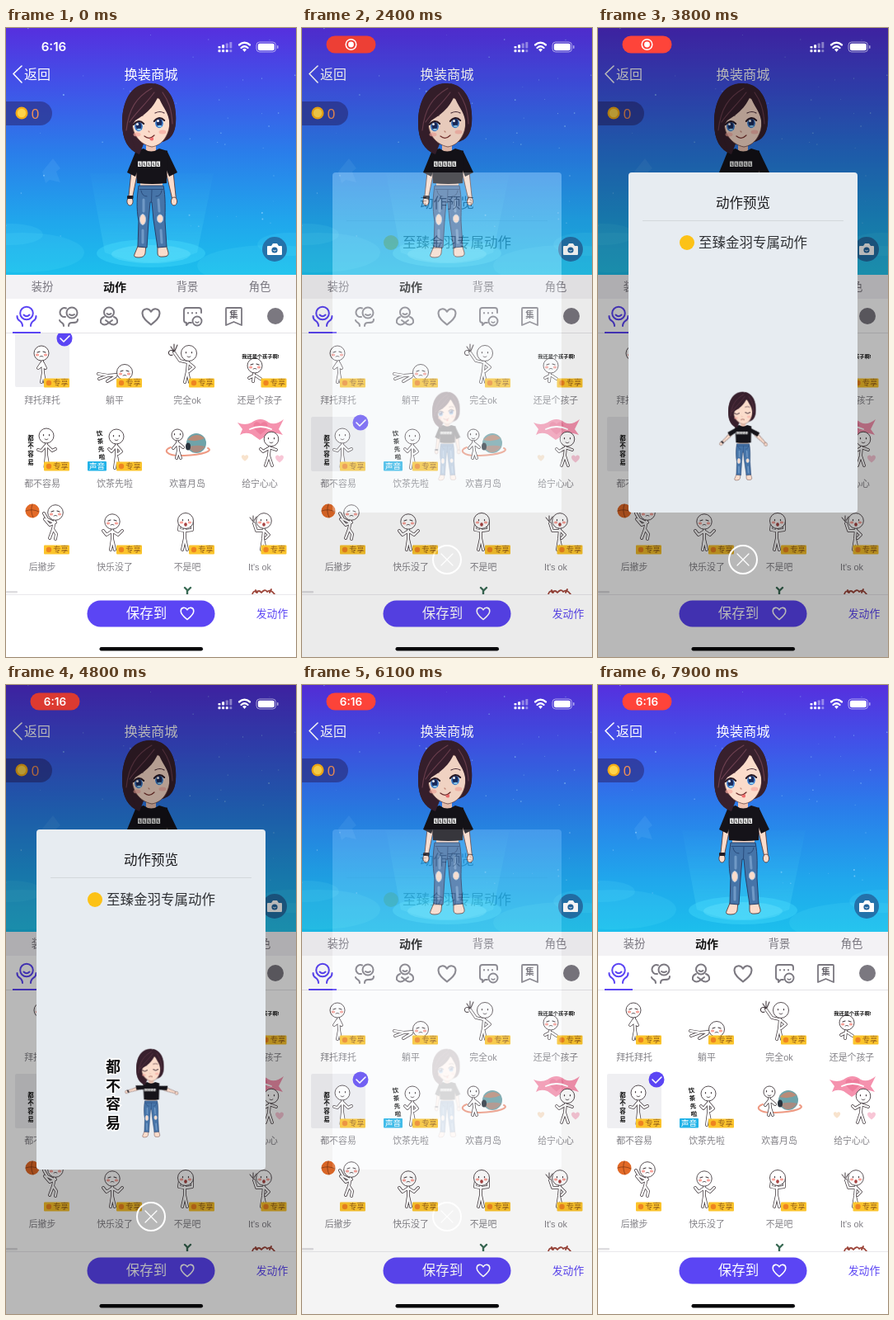
These frames come from a looping animation (352x762 px, 8 s). An HTML page:

```html
<!DOCTYPE html>
<html lang="zh-CN">
<head>
<meta charset="utf-8">
<title>换装商城</title>
<style>
html, body { margin: 0; width: 100%; height: 100%; overflow: hidden; background: #fff; }
svg { display: block; width: 352px; height: 762px; }
text { font-family: "Liberation Sans", "Noto Sans CJK SC", "Noto Sans CJK", sans-serif; }

.clock, .pill, .rec, .pillTime, .selA, .selB, .modal, .word,
.armL, .armR, .preview .head, .tongue, .smile, .shut {
  animation: 8s linear infinite;
}
.clock { animation-name: clock; }
.pill { animation-name: pill; }
.pillBody { animation: pulse 2s ease-in-out -0.1s infinite; }
.rec { animation-name: rec; }
.pillTime { animation-name: pillTime; }
.selA { animation-name: selA; }
.selB { animation-name: selB; }
.modal { animation-name: modal; }
.word { animation-name: word; }
.star { animation: twinkle 4s ease-in-out infinite; }

@keyframes clock { 0%, 5% { opacity: 1 } 7.5%, 100% { opacity: 0 } }
@keyframes pill { 0%, 5% { opacity: 0 } 7.5%, 100% { opacity: 1 } }
@keyframes pulse { 0%, 100% { fill: #ff443a } 50% { fill: #db3a31 } }
@keyframes rec { 0%, 48% { opacity: 1 } 51%, 100% { opacity: 0 } }
@keyframes pillTime { 0%, 48% { opacity: 0 } 51%, 100% { opacity: 1 } }
@keyframes selA { 0%, 28% { opacity: 1 } 28.01%, 100% { opacity: 0 } }
@keyframes selB { 0%, 28% { opacity: 0 } 28.01%, 100% { opacity: 1 } }
@keyframes modal { 0%, 29% { opacity: 0 } 32.5%, 73.1% { opacity: 1 } 76.9%, 100% { opacity: 0 } }
@keyframes word { 0%, 48% { opacity: 0 } 50%, 69% { opacity: 1 } 69.1%, 100% { opacity: 0 } }
@keyframes twinkle { 50% { opacity: .3 } }

/* Faces of the stage figure */
.stage .tongue { animation-name: idleFace; }
.stage .smile { animation-name: busyFace; }
.stage .shut { opacity: 0; animation: none; }
@keyframes idleFace { 0%, 30% { opacity: 1 } 30.01%, 72% { opacity: 0 } 72.01%, 100% { opacity: 1 } }
@keyframes busyFace { 0%, 30% { opacity: 0 } 30.01%, 72% { opacity: 1 } 72.01%, 100% { opacity: 0 } }

/* Preview figure: raise the arms, drop them, shrug, rest */
.preview .tongue { animation-name: restFace; }
.preview .smile { animation-name: cheerFace; }
.preview .shut { animation-name: shrugFace; }
@keyframes restFace { 0%, 33% { opacity: 1 } 33.01%, 69% { opacity: 0 } 69.01%, 100% { opacity: 1 } }
@keyframes cheerFace { 0%, 33% { opacity: 0 } 33.01%, 46% { opacity: 1 } 46.01%, 100% { opacity: 0 } }
@keyframes shrugFace { 0%, 46% { opacity: 0 } 46.01%, 69% { opacity: 1 } 69.01%, 100% { opacity: 0 } }
.armL { transform-origin: 157px 156px; }
.armR { transform-origin: 198px 156px; }
.head { transform-origin: 176px 148px; }
.preview .armL { animation-name: armL; animation-timing-function: ease-in-out; }
.preview .armR { animation-name: armR; animation-timing-function: ease-in-out; }
.preview .head { animation-name: head; animation-timing-function: ease-in-out; }
@keyframes armL {
  0%, 32% { transform: none } 35.5%, 39% { transform: rotate(152deg) }
  45% { transform: rotate(10deg) } 50%, 66% { transform: rotate(62deg) scaleY(.76) }
  70%, 100% { transform: none }
}
@keyframes armR {
  0%, 32% { transform: none } 35.5%, 39% { transform: rotate(-131deg) }
  45% { transform: rotate(-10deg) } 50%, 66% { transform: rotate(-59deg) scaleY(.78) }
  70%, 100% { transform: none }
}
@keyframes head {
  0%, 32% { transform: none } 35.5%, 39% { transform: translate(7px, 0) rotate(4deg) }
  45%, 100% { transform: none }
}
</style>
</head>
<body>
<script>
const INK = '#453c40', GREY = '#7b7880', VIOLET = '#5b45f4', SKIN = '#fbdccb', HAIR = '#38202d';

const el = (tag, attrs, body = '') => `<${tag} ${attrs}>${body}</${tag}>`;
const g = (attrs, ...parts) => el('g', attrs, parts.join(''));
const rect = (x, y, w, h, fill, r = 0, more = '') =>
  el('rect', `x="${x}" y="${y}" width="${w}" height="${h}" rx="${r}" fill="${fill}" ${more}`);
const oval = (x, y, rx, ry, fill, more = '') =>
  el('ellipse', `cx="${x}" cy="${y}" rx="${rx}" ry="${ry}" fill="${fill}" ${more}`);
const dot = (x, y, r, fill, more) => oval(x, y, r, r, fill, more);
const ring = (x, y, r, color, w) => dot(x, y, r, 'none', `stroke="${color}" stroke-width="${w}"`);
const shape = (d, fill, more = '') => el('path', `d="${d}" fill="${fill}" ${more}`);
const line = (d, color, w = 1) =>
  shape(d, 'none', `stroke="${color}" stroke-width="${w}" stroke-linecap="round" stroke-linejoin="round"`);
// Text placed by its vertical centre
const label = (x, cy, s, size, fill, more = 'text-anchor="middle"') =>
  el('text', `x="${x}" y="${cy + size * .36}" font-size="${size}" fill="${fill}" ${more}`, s);
const column = (x, y, gap, s, size, more = '') =>
  [...s].map((c, i) => label(x, y + i * gap, c, size, '#111', `text-anchor="middle" font-weight="900" ${more}`)).join('');
const heart = (x, y, k, fill, stroke = 'none') =>
  shape('M0 9C-5 5-10 1-10-4C-10-10-3-11 0-6C3-11 10-10 10-4C10 1 5 5 0 9Z', fill,
    `transform="translate(${x} ${y}) scale(${k})" stroke="${stroke}" stroke-width="2" stroke-linejoin="round"`);

function eye(x, y) {
  return oval(x, y, 5.4, 6.2, '#fff') + oval(x, y + .3, 4.9, 5.9, '#3c78c4') + oval(x, y - .5, 3.3, 4.2, '#1b2b5c') +
    dot(x - 1.5, y - 2.5, 1.5, '#fff') + oval(x + .5, y + 4, 2.4, 1.3, '#8fd0f4') +
    line(`M${x - 6.2} ${y - 2}Q${x} ${y - 9.5} ${x + 6.2} ${y - 3}`, '#2b1a26', 2);
}

function avatar(cls) {
  const edge = 'stroke="#5b3b3a" stroke-width=".9"', denim = 'stroke="#263f68" stroke-width="1"';
  const arm = (side, d, hx, more) => g(`class="arm${side}"`,
    shape(d, SKIN, edge), oval(hx, 210, 3.6, 5, SKIN, edge), more);
  const face = (name, ...parts) => g(`class="${name}"`, ...parts);
  const eyes = eye(161, 119) + eye(186, 115);
  return g(`class="${cls}"`,
    // feet and legs
    shape('M161 262L170 262L169 273Q168 278 161 278Q154 278 156 274Z', SKIN, edge),
    shape('M184 262L194 262L197 272Q198 277 191 277Q184 278 184 273Z', SKIN, edge),
    rect(163, 182, 27, 12, SKIN),
    shape('M161 191L191 191C194 205 193 220 193 234L195 265L184 266L179 232L177 211L175 211L173 234L171 266L160 265L161 234C158 218 159 204 161 191Z', '#4674a8', denim),
    line('M162 195.500H191M177 196L176.500 211M164 197Q165 204 171 204M189 197Q188 204 182 204', '#294b7c', 1),
    line('M167 208V222M185 208L186 222M166 245V260M188 245L189 260', '#7099c6', 3),
    oval(166, 232, 3.6, 6.5, SKIN, 'stroke="#a9c3dd" stroke-width="1"'),
    oval(187, 231, 3.6, 5, SKIN, 'stroke="#a9c3dd" stroke-width="1"'),
    // arms
    arm('L', 'M153 165L148.500 208L153 208L159 178L160 162Z', 150.5,
      rect(147, 203, 7.5, 4, '#201c25', 1) + shape('M158 148L147 175L157 180L165 157Z', '#151319')),
    arm('R', 'M202 165L206.500 208L202 208L195 178L194 162Z', 204,
      shape('M195 148L208 175L198 180L189 157Z', '#151319')),
    // shirt
    rect(170, 138, 12, 14, '#efc4b2'),
    shape('M167 146Q176 153 186 146L196 149L195 188Q178 190 159 188L157 149Z', '#151319'),
    [0, 1, 2, 3, 4].map(i => rect(160 + i * 5.6, 161.5, 4.7, 6.5, '#eee') +
      line(`M${162 + i * 5.6} 163.3v3h1.2`, '#222', .9)).join(''),
    g('class="head"',
      shape('M176 67C152 66 141 88 141 115C141 135 148 148 162 153L168 138L190 138C204 134 207 120 206 104C205 82 194 68 176 67Z', HAIR),
      shape('M153 110C152 128 162 141 177 144C190 142 198 130 199 114C198 92 190 84 178 84C160 86 154 96 153 110Z', SKIN, 'stroke="#6a4540" stroke-width=".8"'),
      oval(159, 129, 4.5, 2.5, '#f8aaa0', 'opacity=".7"'), oval(190, 126, 4.5, 2.5, '#f8aaa0', 'opacity=".7"'),
      line('M173 125L174 126', '#c98c7c', 1.2),
      line('M157 107Q162 104 166 106M181 103Q187 100 192 103', '#4a2c38', 1.2),
      face('tongue', eyes, line('M168 131Q174 136 180 130', '#6b2b2b', 1.2),
        shape('M174 134L178.500 132Q180 136 177.500 136.500Q175 137 174 134Z', '#f06d6d')),
      face('smile', eyes, line('M168 131Q174 136 180 130', '#7a332f', 1.2)),
      face('shut', line('M155 118Q161 123 167 118M181 116Q187 121 193 116', '#2b1a26', 1.8),
        line('M171 133Q175 131 179 133', '#7a332f', 1.3)),
      shape('M188 73C183 93 172 103 157 112C150 120 151 142 162 153C148 148 141 135 141 115C141 85 155 68 176 67Z', HAIR),
      shape('M182 72C186 93 196 98 198 112C199 121 198 129 195 136C205 131 207 118 206 104C205 84 196 70 180 67Z', HAIR),
      line('M177 73C158 84 149 98 146 124M180 78C168 94 158 102 150 114M190 78C197 88 201 98 202 116', '#6d4050', 1.1)));
}

// Outlined doodle person: head centre and radius, limbs as one path
function doodle(x, y, r, limbs, mood = 0) {
  const eyes = mood == 1
    ? `M${x - 5} ${y - 1}l3 -1M${x + 2} ${y - 2}l3 1`
    : `M${x - 3.5} ${y - 1.5}v1.2M${x + 3.5} ${y - 1.5}v1.2`;
  const mouth = mood == 2 ? oval(x, y + 4.5, 1.8, 2.2, '#a84443')
    : line(`M${x - 2} ${y + 4}q2 ${mood == 1 ? -1.5 : 2} 4 0`, INK, .8);
  return line(limbs, INK, 3.8) + line(limbs, '#fff', 2.3) +
    dot(x, y, r, '#fff', `stroke="${INK}" stroke-width=".9"`) + line(eyes, INK, 1.2) + mouth +
    (mood ? oval(x - 5, y + 2, 2.2, 1.5, '#f7a29a') + oval(x + 5, y + 2, 2.2, 1.5, '#f7a29a') : '');
}

const badge = (x, y) => rect(x, y - 5.5, 31, 11, '#fbc42c', 1) + dot(x + 6, y, 3.2, '#ee8420') +
  label(x + 20.5, y, '专享', 9.3, '#96601c');
const chosen = (cls, y) => g(`class="${cls}"`, rect(11, y, 66, 66, '#efeff2', 2));
const tick = (cls, y) => g(`class="${cls}"`, dot(71, y, 9.5, VIOLET),
  line(`M66 ${y}l4 4l7 -7`, '#fff', 1.6));

function sky() {
  let seed = 7, stars = '';
  const rnd = () => (seed = seed * 16807 % 2147483647) / 2147483647;
  for (let i = 0; i < 44; i++)
    stars += dot((rnd() * 352).toFixed(1), (rnd() * 260).toFixed(1), (.4 + rnd() * .6).toFixed(2), '#9fd8ff',
      `class="star" opacity=".65" style="animation-delay:-${(rnd() * 4).toFixed(2)}s"`);
  return rect(0, 0, 352, 299, 'url(#sky)') +
    shape('M44 174L57 158L66 170L61 174L66 187L53 184L48 188Z', '#7cc4ff', 'opacity=".14"') +
    g('fill-opacity=".1"', oval(20, 272, 75, 24, '#7ef'), oval(5, 250, 40, 13, '#7ef'),
      oval(322, 288, 90, 25, '#7ef'), oval(345, 262, 40, 14, '#7ef')) +
    stars +
    shape('M102 176L252 176L232 272Q176 296 120 272Z', 'url(#beam)') +
    oval(176, 273, 66, 17, '#4fe4ff', 'opacity=".32"') + oval(176, 274, 48, 11, '#7cecff', 'opacity=".28"');
}

function header() {
  return line('M19 46L9 55.5L19 66', '#fff', 1.6) + label(22, 56.5, '返回', 16, '#fff', '') +
    label(176, 56.5, '换装商城', 16.3, '#fff') +
    rect(-20, 89, 76, 29, '#2a2a78', 14.5, 'opacity=".6"') +
    dot(19, 103, 7.5, '#f5ac16') + dot(19, 103, 5.2, '#ffd44a') +
    label(35.5, 103.5, '0', 17, '#f29055') +
    dot(326, 268, 15, '#23659d', 'opacity=".85"') +
    shape('M318 264h4l2-3h5l2 3h3q1 0 1 1v9q0 1-1 1h-16q-1 0-1-1v-9q0-1 1-1z', '#fff') +
    dot(326, 269, 3.6, '#23659d') + line('M324.5 269.5q1.5 1.5 3 0', '#fff', .9);
}

function tabs() {
  const names = ['装扮', '动作', '背景', '角色'];
  return rect(0, 299, 352, 29, '#f3f2f5') + names.map((n, i) => i == 1
      ? label(132, 313.5, n, 14, '#111', 'text-anchor="middle" font-weight="700"')
      : label(44 + 88 * i, 313.5, n, 13.3, '#77747d')).join('') +
    rect(0, 369, 352, 1, '#e4e3e7') + rect(8, 368, 34, 2, VIOLET) +
    // dancer
    ring(25, 345.5, 7.8, VIOLET, 2) +
    line('M21.5 347.5Q25 351 28.5 347.5M13.500 349C13 356 20 353 20 361M36.500 349C37 356 30 353 30 361', VIOLET, 2) +
    // pair
    ring(80, 345, 6.5, GREY, 2) + line('M73 339.500A5.500 5.500 0 1 0 72 350M77 347q3 2 6 0M65 354C66 358 70 356 70 361M87 353C87 357 84 357 80 357Q76 357 76 361', GREY, 2) +
    // trio
    ring(125, 344.500, 6, GREY, 2) +
    line('M122.500 346q2.500 2 5 0M119 350Q114 352 115 357Q119 362 125 357Q131 362 135 357Q136 352 131 350M121 354L125 357L129 354', GREY, 2) +
    heart(176, 350, 1.05, 'none', GREY) +
    // chat
    line('M225 357h-3l-3 3v-3q-3 0-3-3v-12q0-3 3-3h15q3 0 3 3v3M221 345v.5M226 345v.5M231 345v.5', GREY, 1.9) +
    ring(232, 355, 5.5, GREY, 1.9) + line('M230 356q2 2 4 0', GREY, 1.4) +
    // collection
    line('M268 339h17q1 0 1 1v20l-9.500-4l-9.500 4v-20q0-1 1-1z', GREY, 1.8) +
    label(276.5, 347.5, '集', 10.5, '#66636b', 'text-anchor="middle" font-weight="700"') +
    dot(327, 349, 10, GREY);
}

function catalogue() {
  const names = ['拜托拜托', '躺平', '完全ok', '还是个孩子', '都不容易', '饮茶先啦',
    '欢喜月岛', '给宁心心', '后撤步', '快乐没了', '不是吧', 'It\'s ok'];
  const art =
    doodle(43, 394, 9, 'M44 404L45 418L43 429M45 418L47 429M43 406L39 412L43 409M45 406L48 412L43 409', 1) +
    doodle(144, 417, 9.5, 'M135 420L124 421L112 419M124 421L113 425M133 422L123 428', 1) +
    doodle(222, 394, 9.5, 'M221 404L220 416L217 429M220 416L223 429M220 405L211 403L204 393M222 406L228 411L222 416') +
    line('M204 392L200 386M204 391L204 383M205 391L208 384M203 392a3 3 0 1 0 -1 4', INK, 1.1) +
    doodle(302, 409, 9, 'M301 419L300 428M301 421L295 424M303 421L309 425', 1) +
    label(309, 398, '我还是个孩子啊!', 6.2, '#111', 'text-anchor="middle" font-weight="900"') +
    doodle(49, 494, 9, 'M49 504L49 517L47.500 532M49 517L51.500 532M48 506L43 512L39 511M50 506L56 512L60 510') +
    column(30, 497, 9.6, '都不容易', 7.5) +
    doodle(134, 495, 9, 'M134 504L134 518L132 533M134 518L137 533M133 507L128 513L125 510M135 507L140 513L136 516') +
    g('transform="rotate(-6 115 506)"', column(115, 491, 9.6, '饮茶先啦', 7.5)) +
    dot(231, 503, 12, '#6fa3a9') + shape('M220 499Q231 488 241 497Q232 502 220 499Z', '#b98b78') +
    shape('M220 508Q230 504 242 507Q236 515 228 514Z', '#a98b80') +
    line('M200 508C190 511 194 519 216 518C240 517 252 512 245 509', '#ee9a83', 2) +
    doodle(208, 493, 7, 'M208 501L209 512L207 521M209 512L212 521M208 503L203 509M209 503L215 508') +
    oval(221, 507, 3, 4.5, '#29323c') +
    shape('M281 478Q290 482 298 478Q309 470 319 478Q327 482 337 474L331 486L336 493Q325 489 319 492L308 499L298 492Q290 489 284 493L287 486Z', '#f592ae') +
    heart(309, 485, .85, '#ee7d9d') + line('M296 486Q309 480 322 486', '#fff', 1.8) +
    doodle(322, 498, 8.8, 'M320 507L319 518L315 530M319 518L323 530M319 509L312 513L309 510M322 509L328 511') +
    heart(332, 522, .5, '#f8c6d6') + heart(290, 521, .42, '#f8e3cd') +
    dot(32, 585, 8.5, '#e26a28') + line('M24 585Q32 582 40 586M32 577Q29 585 33 593', '#7a3514', .7) +
    doodle(60, 587, 9.3, 'M59 597L57 607L53 618M57 607L61 613L60 619M58 599L50 595L46 588M60 599L53 602L47 595', 1) +
    doodle(129, 598, 9.2, 'M129 608L129 619L127 632M129 619L132 632M128 610L122 614L118 609M130 610L136 614L141 609', 1) +
    doodle(218, 597, 9.5, 'M217 607L217 618L214 632M217 618L220 632M216 609L210 608L211 600M218 609L226 608L226 599', 2) +
    doodle(313, 597, 9.3, 'M313 607L312 619L310 632M312 619L315 632M312 609L304 609L301 600M314 609L319 614L315 618', 2) +
    line('M300 598L296 593M300 597L300 591M301 597L304 592', INK, 1) +
    // tops of the next row
    rect(0, 682, 14, 2.5, '#dedde0', 1) +
    line('M220 688L220 681L217 678M220 682L224 678', '#3a6b55', 2.4) +
    line('M299 686q2-6 5-2q3-4 6 0q4-5 7-1q4-4 9 3M303 681l2 3M322 680l-2 4', '#9c4439', 1.8);
  const badges = names.map((_, i) => i == 6 || i == 7 ? ''
    : badge([46, 134, 222, 309.5][i % 4], 430 + 101 * (i >> 2))).join('');
  return g('clip-path="url(#list)"', chosen('selA', 369), chosen('selB', 471), art, badges,
    rect(99, 525, 23, 11.5, '#22b3e8', 1), label(110.5, 531, '声音', 9.5, '#fff'),
    names.map((n, i) => label(44 + 88 * (i % 4), 451 + 101 * (i >> 2), n, 10.9, '#828086')).join(''),
    tick('selA', 376), tick('selB', 478));
}

function footer() {
  return rect(0, 686, 352, 76, '#fff') + rect(0, 686, 352, 1, '#e9e8ec') +
    rect(98.5, 693.5, 155, 32, VIOLET, 16) + label(170.5, 709.5, '保存到', 16.5, '#fff') +
    heart(220, 709.5, .78, 'none', '#fff') + label(323, 709.5, '发动作', 12.8, VIOLET) +
    rect(113.5, 750, 125.5, 4.5, '#0a0a0c', 2.2);
}

function modal() {
  return g('class="modal"',
    rect(0, 0, 352, 762, '#000', 0, 'opacity=".28"'),
    rect(37, 175, 278, 412, '#e7ecf1', 4),
    label(176, 212.500, '动作预览', 16.5, '#1d1d20'), rect(54, 233, 244, 1, '#d3d8dc'),
    dot(108, 260, 9, '#fcc217'), label(122, 260, '至臻金羽专属动作', 16.5, '#303236', ''),
    g('transform="translate(86.8 407) scale(.507)"', avatar('preview')),
    [...'都不容易'].map((c, i) => g(`class="word" style="animation-delay:${i * 60}ms;animation-fill-mode:backwards"`,
      column(130, 463 + i * 22.4, 0, c, 18, 'stroke="#fff" stroke-width="3" paint-order="stroke"'))).join(''),
    ring(176, 644, 17, '#fff', 2), line('M169 637l14 14M183 637l-14 14', '#fff', 1.2));
}

function statusBar() {
  const time = (x, y, size, cls) => label(x, y, '6:16', size, '#fff',
    `text-anchor="middle" font-weight="600" class="${cls}" style="font-family:Inter,sans-serif"`);
  const bars = [0, 1, 2, 3].map(i => {
    const fade = i > 2 ? 'opacity=".4"' : '';
    return rect(257.5 + i * 4.6, 22 - i * 1.7, 3, 2.5 + i * 1.7, '#fff', .7, i > 1 ? 'opacity=".4"' : '') +
      rect(257.5 + i * 4.6, 26.3, 3, 3, '#fff', .7, fade);
  }).join('');
  return time(58, 23, 15.2, 'clock') +
    g('class="pill"', rect(29.5, 9.5, 60, 21, '#ff443a', 10.5, 'class="pillBody"'),
      g('class="rec"', ring(59.5, 20, 6.3, '#fff', 1.5), dot(59.5, 20, 3.4, '#fff')),
      time(59.5, 20, 13.5, 'pillTime')) +
    bars + line('M283 20.500Q289.500 15 296 20.500M285.500 24Q289.500 20.500 293.500 24', '#fff', 2.3) +
    shape('M287 26Q289.500 24 292 26L289.500 29Z', '#fff') +
    rect(304, 17, 23.5, 12, 'none', 3.8, 'stroke="#fff" stroke-opacity=".55"') +
    rect(305.8, 18.8, 20, 8.4, '#fff', 2.2) + rect(329, 21, 1.5, 4, '#fff', .7, 'opacity=".6"');
}

const stops = list => list.map(([at, color, a = 1]) =>
  `<stop offset="${at}" stop-color="${color}" stop-opacity="${a}"/>`).join('');
const vertical = (id, list) => el('linearGradient', `id="${id}" x1="0" y1="0" x2="0" y2="1"`, stops(list));

document.body.innerHTML = el('svg', 'viewBox="0 0 352 762" xmlns="http://www.w3.org/2000/svg"',
  el('defs', '',
    vertical('sky', [[0, '#562fde'], [.22, '#4250e8'], [.5, '#2a7dea'], [.78, '#20a6ec'], [1, '#1cbfec']]) +
    vertical('beam', [[0, '#5fe4ff', .03], [.5, '#5fe4ff', .13], [1, '#5fe4ff', .28]]) +
    el('clipPath', 'id="list"', '<rect x="0" y="370" width="352" height="316"/>')) +
  rect(0, 0, 352, 762, '#fff') + sky() + header() + avatar('stage') + tabs() + catalogue() + footer() +
  modal() + statusBar());
</script>
</body>
</html>
```
